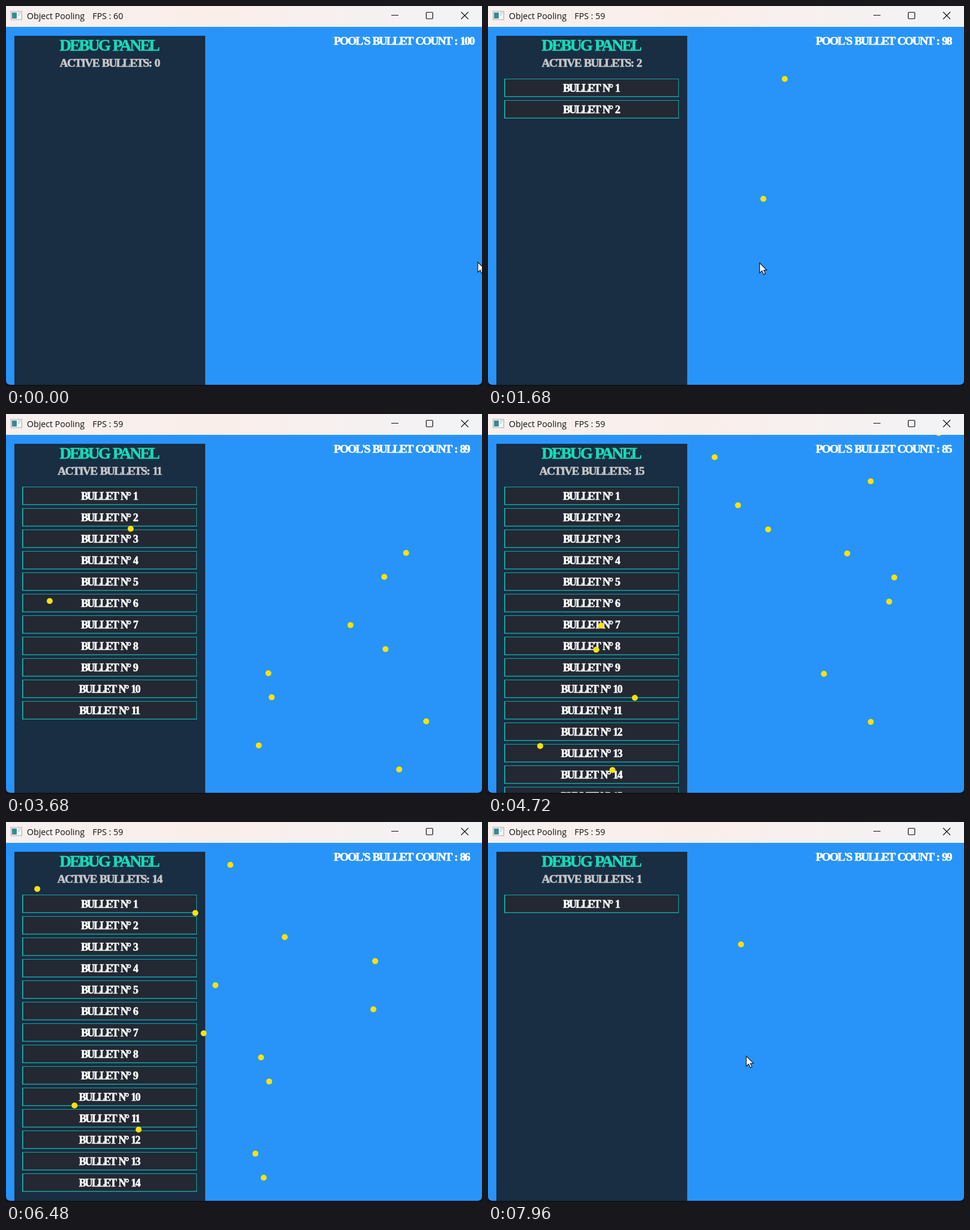
Write an HTML page that moves like this. It is 798 px wide and 638 px high and loops after 8000 ms.

```html
<!DOCTYPE html>
<html lang="en">
<head>
<meta charset="utf-8">
<title>Object Pooling</title>
<style>
  html, body { margin: 0; width: 100%; height: 100%; overflow: hidden; background: #0d1318; }
  svg { display: block; width: 798px; height: 638px; }
  text { white-space: pre; }
  .bar { font: 14.3px "Open Sans", sans-serif; fill: #111; }
  .slab {
    font-family: "Liberation Serif", serif; font-weight: bold; word-spacing: 2px;
    fill: #fff; stroke: #fff; stroke-width: .6px;
  }
  .mid { text-anchor: middle; }
  .heading { font-size: 27.5px; letter-spacing: -2.95px; fill: #15dbb9; stroke: #15dbb9; }
  .active { font-size: 19.5px; letter-spacing: -1.7px; fill: #c8c8c8; stroke: #c8c8c8; }
  .pool { font-size: 19.5px; letter-spacing: -1.95px; }
  .row text { font-size: 18px; letter-spacing: -1.85px; }
  .glyph { fill: none; stroke: #111; stroke-width: 1.2; }
</style>
</head>
<body>
<svg viewBox="0 0 798 638">
  <defs>
    <linearGradient id="chrome">
      <stop offset="0" stop-color="#f7f0ee"/>
      <stop offset=".45" stop-color="#faeeea"/>
      <stop offset="1" stop-color="#f2f3f6"/>
    </linearGradient>
    <clipPath id="window"><path d="M0 0H798V628Q798 636 790 636H8Q0 636 0 628Z"/></clipPath>
  </defs>
  <g clip-path="url(#window)">
    <rect width="798" height="638" fill="#2894fa"/>
    <rect x="14" y="50" width="320" height="588" fill="#192d43"/>
    <text class="slab mid heading" x="172.5" y="75">DEBUG PANEL</text>
    <text class="slab mid active" id="active" x="173.5" y="102"></text>
    <g id="rows"></g>
    <text class="slab pool" id="pool" x="549.5" y="65"></text>
    <g id="bullets" fill="#fbe10d"></g>
    <rect width="798" height="35" fill="url(#chrome)"/>
    <rect x="8.5" y="9" width="18" height="14" fill="#f4f7f8" stroke="#a3abb0"/>
    <rect x="10" y="11" width="8" height="10" fill="#3d8795"/>
    <path d="M20 12h5M20 15h3" stroke="#9fb5c8"/>
    <text class="bar" x="35" y="22">Object Pooling</text>
    <text class="bar" id="fps" x="145" y="22"></text>
    <path class="glyph" d="M646 15.5H658M763 10L775 22M775 10L763 22"/>
    <rect class="glyph" x="704.5" y="10.5" width="11" height="11" rx="1.5"/>
  </g>
  <path id="cursor" d="M0 0V17L4 13.3L6.8 19.5L9.6 18.3L6.8 12.2H12Z" fill="#fff" stroke="#111" stroke-width="1.1"/>
</svg>
<script>
const LOOP = 8000, STEP = 40, POOL = 100;
const SPEED = 1.32, FLOOR = 598, CEILING = 8;
const KEY_DELAY = 500, KEY_REPEAT = 30.61;

const $ = id => document.getElementById(id);
const make = (parent, tag, attrs, text = '') => {
  const el = document.createElementNS('http://www.w3.org/2000/svg', tag);
  for (const key in attrs) el.setAttribute(key, attrs[key]);
  el.textContent = text;
  return parent.appendChild(el);
};

// Pointer stops: time, x, y. It is hidden while the fire key is in use.
const stops = [
  [0, 791, 430], [1300, 520, 425], [1640, 455, 431], [2500, 510, 480],
  [7100, 500, 420], [7700, 412, 410], [LOOP - STEP, 433, 393]
];
const smooth = k => k * k * (3 - 2 * k);
const pointerAt = t => {
  const i = Math.max(1, stops.findIndex(s => s[0] >= t));
  const [t0, x0, y0] = stops[i - 1], [t1, x1, y1] = stops[i];
  const k = smooth((t - t0) / (t1 - t0));
  return [x0 + (x1 - x0) * k, y0 + (y1 - y0) * k];
};
const pointerShown = t => t < 2873 || t >= 7100;

let seed = 17;
const random = () => (seed = seed * 16807 % 2147483647) / 2147483647;

const shots = [];
const fireFromFloor = born => shots.push({ born, x: 30 + random() * 758, y: FLOOR });
const holdKey = (from, to) => {
  fireFromFloor(from);
  for (let t = from + KEY_DELAY; t < to; t += KEY_REPEAT) fireFromFloor(t);
};
const clickRepeatedly = (from, to, gap) => {
  for (let born = from; born < to; born += gap) {
    const [x, y] = pointerAt(born);
    shots.push({ born, x: x + 4, y });
  }
};

clickRepeatedly(999, 2560, 150);
holdKey(2873, 5060);
holdKey(5581.5, 6970);
clickRepeatedly(7210, 7820, 200);

const rows = Array.from({ length: 16 }, (_, i) => {
  const row = make($('rows'), 'g', { class: 'row', transform: `translate(27 ${122 + i * 36})` });
  make(row, 'rect', { width: 293, height: 31, fill: '#19a39d' });
  make(row, 'rect', { x: 2, y: 1, width: 290, height: 28.5, fill: '#242832' });
  make(row, 'text', { class: 'slab mid', x: 146, y: 21.5 }, `BULLET N° ${i + 1}`);
  return row;
});
const dots = shots.map(s => make($('bullets'), 'circle', { cx: s.x, r: 5 }));
const show = (el, on) => el.setAttribute('visibility', on ? 'visible' : 'hidden');

function draw(t) {
  let count = 0;
  shots.forEach((s, i) => {
    const y = s.y - SPEED * (t - s.born);
    const alive = t >= s.born && y > CEILING;
    if (alive) {
      count++;
      dots[i].setAttribute('cy', y);
    }
    show(dots[i], alive);
  });
  rows.forEach((row, i) => show(row, i < count));
  $('active').textContent = `ACTIVE BULLETS: ${count}`;
  $('pool').textContent = `POOL'S BULLET COUNT : ${POOL - count}`;
  $('fps').textContent = `FPS : ${t < 900 ? 60 : 59}`;
  show($('cursor'), pointerShown(t));
  $('cursor').setAttribute('transform', `translate(${pointerAt(t)})`);
}

const start = performance.now();
function tick(now) {
  const t = Math.max(0, now - start) % LOOP;
  draw(Math.floor(t / STEP) * STEP);
  requestAnimationFrame(tick);
}
draw(0);
requestAnimationFrame(tick);
</script>
</body>
</html>
```
